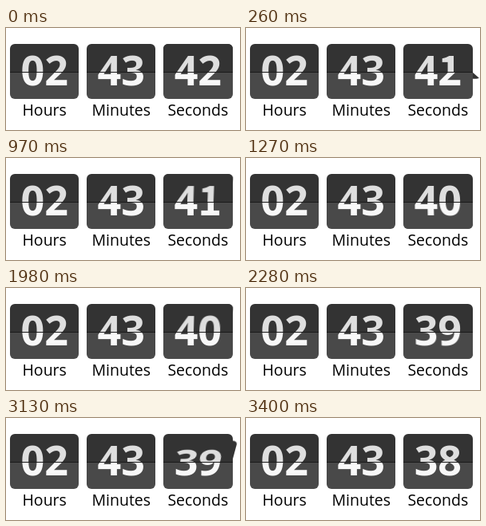
An HTML page for the animation above (3.5 s loop, 293 px wide and 128 px high).

```html
<!DOCTYPE html>
<html lang="en">
<head>
<meta charset="utf-8">
<title>Countdown</title>
<style>
  html, body { margin: 0; width: 100%; height: 100%; overflow: hidden; background: #fff; }
  main {
    position: relative; width: 293px; height: 128px; overflow: hidden;
    font-family: "Open Sans", "Noto Sans", sans-serif; text-align: center;
    perspective: 500px; perspective-origin: 144px 55px;
  }
  main > div { position: absolute; width: 86.35px; }
  .half { overflow: hidden; font-weight: 700; font-size: 52px; line-height: 64px; white-space: nowrap; }
  .top {
    top: 20px; height: 35px; background: #333; color: #dedede;
    border-radius: 6px 6px 0 0; transform-origin: 50% 100%;
  }
  .bottom {
    top: 55px; height: 34px; background: #494949; color: #f8f8f8; z-index: 1;
    border-radius: 0 0 6px 6px; transform-origin: 50% 0;
  }
  .bottom span { display: block; margin-top: -35px; }
  .half b { font-family: "Noto Sans CJK SC", "Noto Sans CJK JP", sans-serif; font-size: 51px; line-height: 0; }
  .seam { top: 55px; height: 1px; background: #1a1a1a; z-index: 2; }
  .label { top: 93px; font-size: 19.5px; line-height: 20px; color: #000; white-space: nowrap; }
</style>
</head>
<body>
<main></main>
<script>
const LOOP = 3500, FLIP = 398, FIRST = 42;
const SWAP = 120; // angle at which the lower flap takes over
const starts = [-42, 881, 1891, 2933];
// The picture is held between these moments
const ticks = [-42, 140, 260, 410, 970, 1120, 1270, 1420,
  1980, 2130, 2280, 2440, 3010, 3130, 3280, 3400];
const stage = document.querySelector('main');

function add(column, cls, text = '') {
  const el = document.createElement('div');
  el.className = cls;
  el.style.left = 5 + 96.1 * column + 'px';
  el.append(document.createElement('span'));
  setText(el, text);
  stage.append(el);
  return el;
}

// The digit 1 takes a face that gives it a foot
function setText(el, value) {
  el.firstChild.innerHTML = String(value).replace('1', '<b>1</b>');
}

function card(column, label, value) {
  const top = add(column, 'half top', value);
  const bottom = add(column, 'half bottom', value);
  add(column, 'label', label);
  add(column, 'seam');
  return { top, bottom };
}

function pose(el, angle, visible) {
  el.style.transform = `rotateX(${angle}deg)`;
  el.style.visibility = visible ? 'visible' : 'hidden';
}

card(0, 'Hours', '02');
card(1, 'Minutes', '43');
const seconds = card(2, 'Seconds', '42');
const upperFlap = add(2, 'half top');
const lowerFlap = add(2, 'half bottom');

function draw(now) {
  const time = now % LOOP;
  const t = ticks.findLast(tick => tick <= time);
  const n = starts.findLastIndex(start => start <= t);
  const angle = 180 * Math.min(1, (t - starts[n]) / FLIP) ** 2;
  const before = FIRST - n, after = before - 1;

  setText(seconds.top, after);
  setText(seconds.bottom, angle < 180 ? before : after);
  setText(upperFlap, before);
  setText(lowerFlap, after);
  pose(upperFlap, -angle, angle < SWAP);
  pose(lowerFlap, 180 - angle, angle >= SWAP && angle < 180);
}

const origin = performance.now();
function frame() {
  draw(performance.now() - origin);
  requestAnimationFrame(frame);
}
frame();
</script>
</body>
</html>
```
